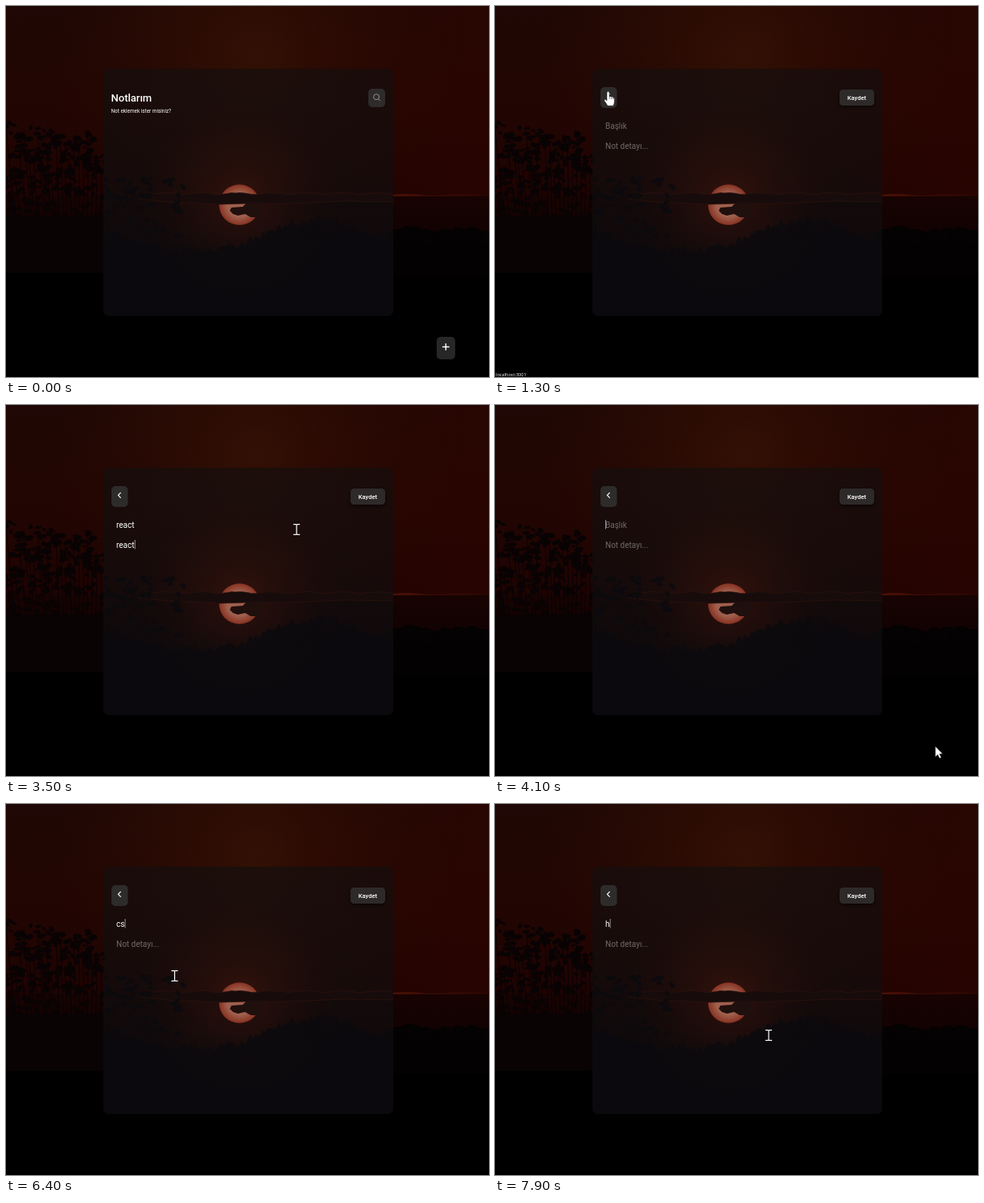
An HTML page that plays this animation: 600 px wide and 462 px high, repeating every 8 s.

```html
<!DOCTYPE html>
<html lang="tr">
<head>
<meta charset="utf-8">
<title>Notlarım</title>
<style>
  html, body { margin: 0; width: 100%; height: 100%; overflow: hidden; background: #000; }
  svg { display: block; width: 100vw; height: 100vh; }
  text { font-family: Roboto, Arial, sans-serif; fill: #fff; white-space: pre; }
  .hint { fill: #716b69; }
  .button { fill: #2e2b2b; }
  .line { fill: none; stroke: #fff; stroke-linecap: round; stroke-linejoin: round; }
</style>
</head>
<body>
<svg viewBox="0 0 600 462" preserveAspectRatio="none">
  <defs>
    <linearGradient id="sky" x2="0" y2="1">
      <stop offset="0" stop-color="#1f0805"/>
      <stop offset=".5" stop-color="#220603"/>
      <stop offset="1" stop-color="#1e0302"/>
    </linearGradient>
    <radialGradient id="warmth" gradientUnits="userSpaceOnUse" cx="310" cy="60" r="260">
      <stop offset="0" stop-color="#3a1404" stop-opacity=".7"/>
      <stop offset="1" stop-color="#300a02" stop-opacity="0"/>
    </radialGradient>
    <linearGradient id="redSide">
      <stop offset="0" stop-color="#2e0500" stop-opacity="0"/>
      <stop offset="1" stop-color="#2e0500" stop-opacity=".6"/>
    </linearGradient>
    <linearGradient id="water" x2="0" y2="1">
      <stop offset="0" stop-color="#170302"/>
      <stop offset=".55" stop-color="#120202"/>
      <stop offset="1" stop-color="#000"/>
    </linearGradient>
    <linearGradient id="panel" x2="0" y2="1">
      <stop offset="0" stop-color="#130f0e"/>
      <stop offset=".6" stop-color="#100e10"/>
      <stop offset="1" stop-color="#0f0f14"/>
    </linearGradient>
    <radialGradient id="haze">
      <stop offset="0" stop-color="#5a1a0c" stop-opacity=".42"/>
      <stop offset=".4" stop-color="#48180c" stop-opacity=".24"/>
      <stop offset="1" stop-color="#301008" stop-opacity="0"/>
    </radialGradient>
    <radialGradient id="sunFill">
      <stop offset=".6" stop-color="#a0604e"/>
      <stop offset="1" stop-color="#873222"/>
    </radialGradient>
    <linearGradient id="rim">
      <stop offset="0" stop-color="#4a1006"/>
      <stop offset="1" stop-color="#4a1006" stop-opacity=".2"/>
    </linearGradient>
    <filter id="soft" x="-30%" y="-60%" width="160%" height="220%"><feGaussianBlur stdDeviation="4"/></filter>
    <filter id="fine" x="-20%" y="-20%" width="140%" height="140%"><feGaussianBlur stdDeviation=".7"/></filter>
    <filter id="shade" x="-30%" y="-30%" width="160%" height="190%">
      <feDropShadow dx="0" dy="2" stdDeviation="2.5" flood-opacity=".55"/>
    </filter>
    <clipPath id="frame"><rect x="121" y="78" width="360" height="308" rx="7"/></clipPath>
  </defs>

  <rect width="600" height="237" fill="url(#sky)"/>
  <rect width="600" height="237" fill="url(#warmth)"/>
  <rect x="330" width="270" height="237" fill="url(#redSide)"/>
  <rect y="236" width="600" height="84" fill="url(#water)"/>
  <rect x="275" y="392" width="44" height="64" fill="#050102" filter="url(#soft)"/>
  <path d="M481 235Q500 233 515 235T550 235T600 236V237H481Z" fill="url(#rim)" filter="url(#fine)"/>
  <g id="plants" fill="#090304" stroke="#090304" filter="url(#fine)"></g>

  <rect x="121" y="78" width="360" height="308" rx="7" fill="url(#panel)" fill-opacity=".65"/>
  <g clip-path="url(#frame)">
    <circle cx="291" cy="240" r="125" fill="url(#haze)"/>
    <g filter="url(#fine)">
      <circle cx="290" cy="247.5" r="25.3" fill="url(#sunFill)"/>
      <path id="clouds" fill="#170c0b" stroke="#30140e" stroke-width=".7"/>
      <path d="M318 244L298 246 294 250 280 251 278 255 282 259 288 261 297 259 304 263 318 263Z" fill="#1f0f0d"/>
    </g>
    <g id="bushes" fill="#0c0a0d" filter="url(#fine)"></g>
  </g>

  <g id="list">
    <text x="130.5" y="119" font-size="13" font-weight="500">Notlarım</text>
    <text id="empty" x="130.5" y="132.6" font-size="6.4">Not eklemek ister misiniz?</text>
    <g id="cards"></g>
    <rect class="button" x="450" y="103" width="21" height="23" rx="5"/>
    <path class="line" style="stroke:#aaa6a5" stroke-width=".8" d="M463.6 113.2a3.5 3.5 0 1 1-7 0a3.5 3.5 0 1 1 7 0M462.6 115.8L464.8 118"/>
    <rect x="535" y="412" width="23" height="28" rx="5" fill="#272727"/>
    <path class="line" stroke-width="1.4" d="M542.6 424.5h7.6M546.4 420.7v7.6"/>
  </g>

  <g id="editor">
    <rect class="button" x="131" y="101" width="20.5" height="26" rx="5"/>
    <path class="line" stroke-width="1.2" d="M142.3 109.4L139.4 112.4 142.3 115.4"/>
    <rect class="button" x="428" y="104" width="43" height="20" rx="4.5" filter="url(#shade)"/>
    <text x="449.4" y="116.5" font-size="7.6" font-weight="500" text-anchor="middle">Kaydet</text>
    <text id="title" x="137" y="152.6" font-size="10"></text>
    <text id="detail" x="137" y="177.6" font-size="10"></text>
    <rect id="caret" width=".8" height="11.5" fill="#b8b4b3"/>
  </g>

  <text id="status" x="1" y="461" font-size="5.6" style="font-family:'Open Sans',sans-serif"></text>

  <g id="cursor">
    <path id="arrow" d="M0 0V13.2L3 10.4 5.2 15 7.4 14 5.3 9.6H9.2Z" fill="#fff" stroke="#111" stroke-width=".5"/>
    <path id="hand" d="M-1.5 1Q-1.5-.4 0-.4T1.5 1V6Q2.8 4.9 4 6.3Q5.3 5.4 6.2 7Q7.8 6.5 7.8 8.6V12Q7.8 14.5 6.4 17.3H-.6Q-2 14.6-4.3 11.6Q-5.3 10-4.2 9.4Q-3 8.9-1.5 11ZM1.6 6V9M4 6.6V9.2M6.2 7.2V9.4" fill="#fff" stroke="#111" stroke-width=".5"/>
    <path id="beam" class="line" stroke-width="1.2" d="M-3.6-6.4H-1Q0-6.4 0-5.4Q0-6.4 1-6.4H3.6M0-5.4V5.4M-3.6 6.4H-1Q0 6.4 0 5.4Q0 6.4 1 6.4H3.6"/>
  </g>
</svg>

<script>
const LOOP = 8000, STEP = 100, GLIDE = 200;
const $ = id => document.getElementById(id);
const show = (id, on) => { $(id).style.display = on ? '' : 'none'; };

function add(parent, tag, attrs, text = '') {
  const node = document.createElementNS('http://www.w3.org/2000/svg', tag);
  for (const key in attrs) node.setAttribute(key, attrs[key]);
  node.textContent = text;
  parent.append(node);
}

let seed = 11;
const random = () => (seed = seed * 16807 % 2147483647) / 2147483647;
const between = (low, high) => low + random() * (high - low);

function leaf(parent, x, y) {
  add(parent, 'ellipse', { cx: x, cy: y, rx: between(2, 5), ry: between(1.4, 3.2),
    transform: `rotate(${between(-50, 50)} ${x} ${y})`, stroke: 'none' });
}

function drawLandscape() {
  const plants = $('plants'), bushes = $('bushes');
  for (let i = 0; i < 22; i++) {
    const x = i * 5.6, y = between(150, 215);
    add(plants, 'path', { d: `M${x} ${y}Q${x + 3} ${y + 45} ${x * .8 + 18} 300`, fill: 'none' });
    for (let n = 0; n < 9; n++) leaf(plants, x + between(-10, 10), y + between(-7, 9));
  }
  for (let i = 0; i < 220; i++) leaf(plants, between(0, 125), 300 - 90 * random() ** 1.3);
  add(plants, 'rect', { x: -5, y: 262, width: 130, height: 70 });
  for (let x = 478; x < 606; x += 2.5) {
    add(plants, 'circle', { cx: x, cy: between(284, 296), r: between(5, 11), stroke: 'none', fill: '#040202' });
  }
  add(plants, 'rect', { x: 478, y: 297, width: 130, height: 40, fill: '#030102', stroke: 'none' });

  let top = 'M165 240';
  for (let x = 170; x <= 485; x += 5) top += `L${x} ${235 - 3 * Math.abs(Math.sin(x / 14)) * between(.6, 1)}`;
  $('clouds').setAttribute('d', top + 'V244L420 243 350 246 300 246 266 247 200 244Z');

  for (let i = 0; i < 70; i++) leaf(bushes, between(121, 220), between(215, 290));
  const ridge = x => 304 - 38 * Math.exp(-(((x - 385) / 75) ** 2)) - 22 * Math.exp(-(((x - 121) / 50) ** 2));
  let ground = 'M121 390';
  for (let x = 121; x <= 483; x += 3) ground += `L${x} ${ridge(x) + between(-6, 6)}`;
  add(bushes, 'path', { d: ground + 'V390Z', 'fill-opacity': .85 });
}

const PLUS = [547, 425], SAVE = [449, 112], BACK = [140.5, 107], SEARCH = [454, 110];

// Each visit to the editor; the pointer waits at `rest` while the note is typed.
const visits = [
  { open: 800, close: 1500 },
  { open: 1900, close: 3700, name: 'react', typeAt: 2200, rest: [273, 198] },
  { open: 4000, close: 4900, name: 'js', typeAt: 4300, rest: [232, 206] },
  { open: 5800, close: 7000, name: 'css', typeAt: 6300, rest: [209.5, 214] },
  { open: 7500, close: 9500, name: 'html', typeAt: 7900, rest: [340, 288] }
];

// Pointer moves as [arrival, spot]; each glide ends on arrival.
const moves = [[100, [598, 412]], [1200, BACK], [5200, SEARCH]];
for (const { open, close, name, typeAt, rest } of visits) {
  moves.push([open - STEP, PLUS]);
  if (name) moves.push([typeAt, rest], [close - STEP, SAVE]);
}
moves.sort((a, b) => a[0] - b[0]);

function pointerAt(t) {
  let [x, y] = moves[0][1];
  for (const [arrival, spot] of moves) {
    const p = Math.min(1, Math.max(0, (t - arrival) / GLIDE + 1)), k = p * p * (3 - 2 * p);
    x += (spot[0] - x) * k;
    y += (spot[1] - y) * k;
  }
  return [x, y];
}

function pointerKind(x, y, editing) {
  const inside = (l, top, r, b) => x >= l && x <= r && y >= top && y <= b;
  if (editing) {
    if (inside(131, 101, 152, 127) || inside(428, 104, 471, 124)) return 'hand';
    return inside(131, 138, 471, 330) ? 'beam' : 'arrow';
  }
  return inside(535, 412, 558, 440) || inside(450, 103, 471, 126) ? 'hand' : 'arrow';
}

function setField(id, value, hint) {
  $(id).textContent = value || hint;
  $(id).setAttribute('class', value ? '' : 'hint');
}

function drawCards(t) {
  const saved = visits.filter(visit => visit.name && visit.close <= t).reverse();
  $('cards').replaceChildren();
  saved.forEach(({ name }, i) => {
    const x = 131 + i % 2 * 174, y = 126 + (i >> 1) * 45;
    add($('cards'), 'rect', { x, y, width: 166, height: 36.5, rx: 5, fill: '#64130a' });
    add($('cards'), 'text', { x: x + 6, y: y + 13.3, 'font-size': 6.6, 'font-weight': 500 }, name);
    add($('cards'), 'text', { x: x + 6, y: y + 28.2, 'font-size': 5.1 }, 'Aralık 26, 2023 [18: 59]');
  });
  show('empty', !saved.length);
}

function drawEditor(t, { open, name = '', typeAt = LOOP }) {
  const detailAt = typeAt + (name.length + 1) * STEP;
  const typed = start => name.slice(0, Math.max(0, Math.floor((t - start) / STEP) + 1));
  setField('title', typed(typeAt), 'Başlık');
  setField('detail', typed(detailAt), 'Not detayı...');

  const inDetail = t >= detailAt;
  const start = inDetail ? detailAt : typeAt, value = typed(start);
  const lastKey = value ? start + (value.length - 1) * STEP : open;
  const width = value ? $(inDetail ? 'detail' : 'title').getComputedTextLength() : 0;
  $('caret').setAttribute('x', 137.2 + width);
  $('caret').setAttribute('y', inDetail ? 168 : 143);
  show('caret', (t - lastKey) % 1000 < 500);
}

function statusAt(t) {
  if (t >= 1200 && t < 1600) return 'localhost:3001';
  return t >= 700 && t < 1000 || t >= 1800 && t < 2100 ? 'localhost:3001/new' : '';
}

let clock = -1;
function render(t) {
  clock = t;
  const visit = visits.find(({ open, close }) => t >= open && t < close);
  show('list', !visit);
  show('editor', visit);
  if (visit) drawEditor(t, visit); else drawCards(t);

  const [x, y] = pointerAt(t), kind = pointerKind(x, y, visit);
  for (const id of ['arrow', 'hand', 'beam']) show(id, id === kind);
  $('cursor').setAttribute('transform', `translate(${x} ${y})`);
  show('cursor', t >= 100);
  $('status').textContent = statusAt(t);
}

const begin = performance.now();
function tick() {
  const t = Math.floor((performance.now() - begin) % LOOP / STEP) * STEP;
  if (t !== clock) render(t);
  requestAnimationFrame(tick);
}

drawLandscape();
render(0);
tick();
</script>
</body>
</html>
```
